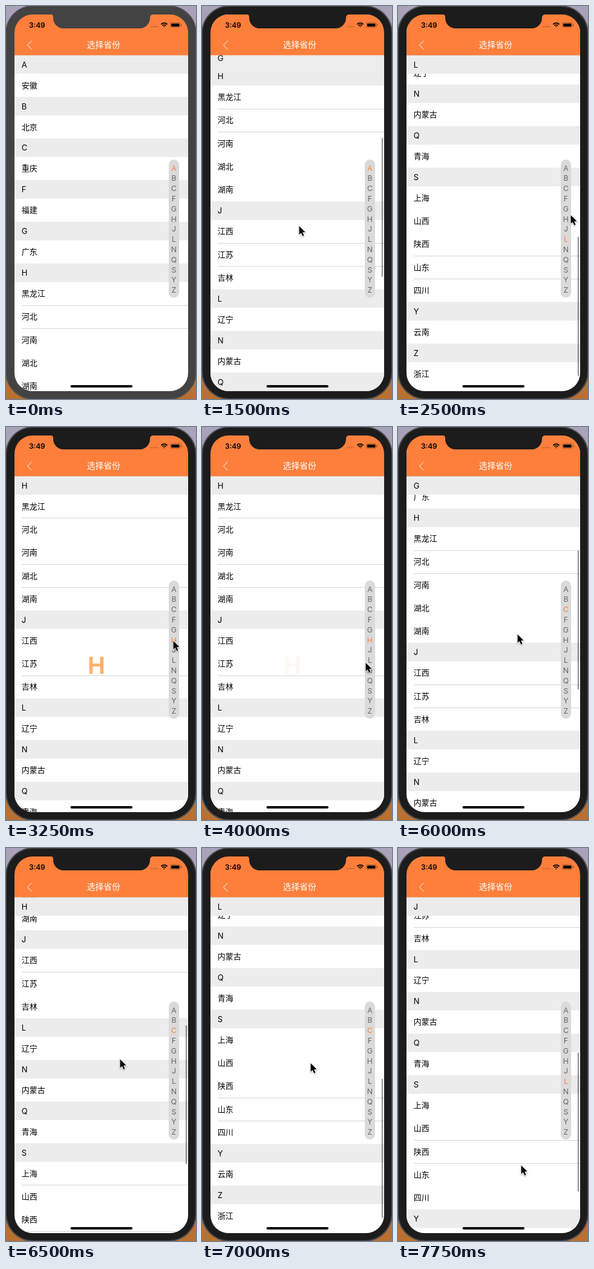
An HTML page with a canvas that plays this animation: 314 by 650 pixels, repeating every 8 s.

```html
<!DOCTYPE html>
<html lang="zh-CN">
<head>
<meta charset="utf-8">
<title>选择省份</title>
<style>
html, body { margin: 0; width: 100%; height: 100%; overflow: hidden; background: #1c1c1c; }
canvas { display: block; width: 314px; height: 650px; }
</style>
</head>
<body>
<canvas id="stage"></canvas>
<script>
const W = 314, H = 650, LOOP = 8000, STEP = 250;
const LEFT = 14, RIGHT = 301, TOP = 81.4, BOTTOM = 637;
const HEAD = 30.6, ROW = 38.3;
const ORANGE = '#fd7f3b';
const SANS = 'Inter, "Noto Sans CJK SC", "Noto Sans CJK", sans-serif';
const CJK = '"Noto Sans CJK SC", "Noto Sans CJK", sans-serif';

const canvas = document.getElementById('stage');
const ctx = canvas.getContext('2d');
const dpr = window.devicePixelRatio || 1;
canvas.width = W * dpr;
canvas.height = H * dpr;

let end = 0;
const sections = ('A安徽 B北京 C重庆 F福建 G广东 H黑龙江,河北,河南,湖北,湖南 J江西,江苏,吉林 ' +
  'L辽宁 N内蒙古 Q青海 S上海,山西,陕西,山东,四川 Y云南 Z浙江').split(' ').map(s => {
  const section = { letter: s[0], rows: s.slice(1).split(','), top: end };
  end += HEAD + section.rows.length * ROW;
  return section;
});
const topOf = letter => sections.find(s => s.letter === letter).top;
const MAX = end - 546;

// Each gesture eases the list and the cursor; its letter is picked when it ends.
const gestures = [
  { from: 500, to: 1500, scroll: 325, x: 161, y: 364 },
  { from: 1500, to: 2500, scroll: MAX, x: 286, y: 346, pick: 'L' },
  { from: 2500, to: 3000, scroll: topOf('H'), x: 278, y: 347, pick: 'H' },
  { from: 3000, to: 4000, scroll: topOf('H'), x: 271, y: 390 },
  { from: 4500, to: 4750, scroll: topOf('C'), x: 277, y: 297, pick: 'C' },
  { from: 5500, to: 6000, scroll: 291, x: 198, y: 343 },
  { from: 6000, to: 7000, scroll: MAX, x: 180, y: 356 },
  { from: 7000, to: 7750, scroll: 624.4, x: 204, y: 525, pick: 'L' }
];

const clamp = (v, lo, hi) => Math.max(lo, Math.min(hi, v));
const ease = f => f * f * (3 - 2 * f);

function stateAt(t) {
  const state = { scroll: 0, x: 163, y: 420, active: 'A', pickedAt: 0 };
  for (const g of gestures) {
    const f = ease(clamp((t - g.from) / (g.to - g.from), 0, 1));
    for (const key of ['scroll', 'x', 'y']) state[key] += (g[key] - state[key]) * f;
    if (g.pick && t >= g.to) {
      state.active = g.pick;
      state.pickedAt = g.to;
    }
  }
  state.settled = Math.abs(state.scroll - topOf(state.active)) < .01;
  return state;
}

function rect(x, y, w, h, fill) {
  ctx.fillStyle = fill;
  ctx.fillRect(x, y, w, h);
}

function pill(x, y, w, h, r, fill) {
  ctx.beginPath();
  ctx.roundRect(x, y, w, h, r);
  ctx.fillStyle = fill;
  ctx.fill();
}

function text(str, x, y, font, fill, align = 'left') {
  ctx.font = font;
  ctx.fillStyle = fill;
  ctx.textAlign = align;
  ctx.fillText(str, x, y);
}

function drawBody(color) {
  const back = ctx.createLinearGradient(0, 0, 0, H);
  back.addColorStop(0, '#a8a3bb');
  back.addColorStop(1, '#b9702f');
  rect(0, 0, W, H, back);
  pill(-1, -1, W + 2, H + 2, 46, '#4c4c50');
  pill(1, 1, W - 2, H - 2, 44, color);
}

function drawList(scroll) {
  rect(LEFT, TOP, RIGHT - LEFT, BOTTOM - TOP, '#fff');
  for (const { letter, rows, top } of sections) {
    const y = TOP + top - scroll;
    rows.forEach((name, i) => {
      const base = y + HEAD + i * ROW, line = base + ROW;
      text(name, 25.8, base + 23.6, '13px ' + CJK, '#000');
      // Hairlines only survive close to a whole pixel.
      const sharp = Math.abs(line - Math.round(line)) < .3;
      if (sharp && i < rows.length - 1) rect(26, Math.round(line), RIGHT - 26, 1, '#d6d6d6');
    });
    const head = Math.max(y, Math.min(TOP, y + rows.length * ROW));
    rect(LEFT, head, RIGHT - LEFT, HEAD, '#ececec');
    text(letter, 25.8, head + 20.2, '13px ' + SANS, '#000');
  }
}

function drawIndex(active) {
  pill(269, 254, 17, 228.5, 8.5, '#dadada');
  sections.forEach(({ letter }, i) => {
    const color = letter === active ? ORANGE : '#666';
    text(letter, 277.4, 272.5 + i * 16.8, '12.3px ' + SANS, color, 'center');
  });
}

function drawStatus() {
  text('3:49', 38, 35.6, '600 11.8px ' + SANS, '#000');
  for (let i = 0; i < 4; i++) pill(239 + i * 3.4, 33, 2.3, 2.3, 1.1, '#b8683c');
  ctx.strokeStyle = '#000';
  ctx.lineWidth = 1.8;
  for (let r = 1; r < 8; r += 3.1) {
    ctx.beginPath();
    ctx.arc(261.5, 35.4, r, -Math.PI * .75, -Math.PI * .25);
    ctx.stroke();
  }
  ctx.beginPath();
  ctx.roundRect(271.5, 27.5, 16.5, 8, 2.2);
  ctx.strokeStyle = '#8f4e2c';
  ctx.lineWidth = .8;
  ctx.stroke();
  pill(273, 29, 13.5, 5, 1, '#000');
  pill(289, 30, 1.2, 3, .6, '#8f4e2c');
}

function drawNav() {
  rect(LEFT, 14, RIGHT - LEFT, TOP - 14, ORANGE);
  ctx.beginPath();
  ctx.moveTo(42.5, 57.5);
  ctx.lineTo(35.5, 64.7);
  ctx.lineTo(42.5, 72);
  ctx.strokeStyle = '#fff';
  ctx.lineWidth = 1;
  ctx.stroke();
  text('选择省份', 161.3, 69.1, '13.8px ' + CJK, '#fff', 'center');
  drawStatus();
}

function drawNotch(color) {
  const l = 78, r = 238, top = 14, bottom = 37;
  ctx.beginPath();
  ctx.moveTo(l - 8, top - 1);
  ctx.arcTo(l, top, l, bottom, 5);
  ctx.arcTo(l, bottom, r, bottom, 17);
  ctx.arcTo(r, bottom, r, top, 17);
  ctx.arcTo(r, top, r + 8, top, 5);
  ctx.lineTo(r + 8, top - 1);
  ctx.fillStyle = color;
  ctx.fill();
}

function drawHint(letter, age) {
  ctx.globalAlpha = clamp(1 - age / 1080, .07, 1);
  text(letter, 149.5, 408, '700 38px ' + SANS, '#ff9a3c', 'center');
  ctx.globalAlpha = 1;
}

function drawCursor(x, y) {
  ctx.save();
  ctx.translate(x - .4, y);
  const arrow = new Path2D('M0 0V14L3.2 11.2L5.6 16.6L8 15.6L5.6 10.3L10 10.1Z');
  ctx.shadowColor = 'rgba(0,0,0,.35)';
  ctx.shadowBlur = 2 * dpr;
  ctx.shadowOffsetY = dpr;
  ctx.strokeStyle = '#fff';
  ctx.lineWidth = 1.8;
  ctx.stroke(arrow);
  ctx.shadowColor = 'transparent';
  ctx.fillStyle = '#000';
  ctx.fill(arrow);
  ctx.restore();
}

function draw(t) {
  const { scroll, x, y, active, pickedAt, settled } = stateAt(t);
  const body = t < 500 ? '#434343' : '#1c1c1c';
  ctx.setTransform(dpr, 0, 0, dpr, 0, 0);
  drawBody(body);

  ctx.save();
  ctx.beginPath();
  ctx.roundRect(LEFT, 14, RIGHT - LEFT, BOTTOM - 14, 30);
  ctx.clip();
  drawList(scroll);
  drawNav();
  drawIndex(active);
  if (!settled) pill(296.8, 87.3 + .402 * scroll, 2.2, 230, 1.1, 'rgba(0,0,0,.42)');
  if (settled && pickedAt) drawHint(active, t - pickedAt);
  pill(106.5, 627, 102.5, 4, 2, '#000');
  ctx.restore();

  drawNotch(body);
  if (t > 500) drawCursor(x, y);
}

const start = performance.now();
function tick() {
  const t = (performance.now() - start) % LOOP;
  draw(Math.floor(t / STEP) * STEP);
  requestAnimationFrame(tick);
}
tick();
</script>
</body>
</html>
```
